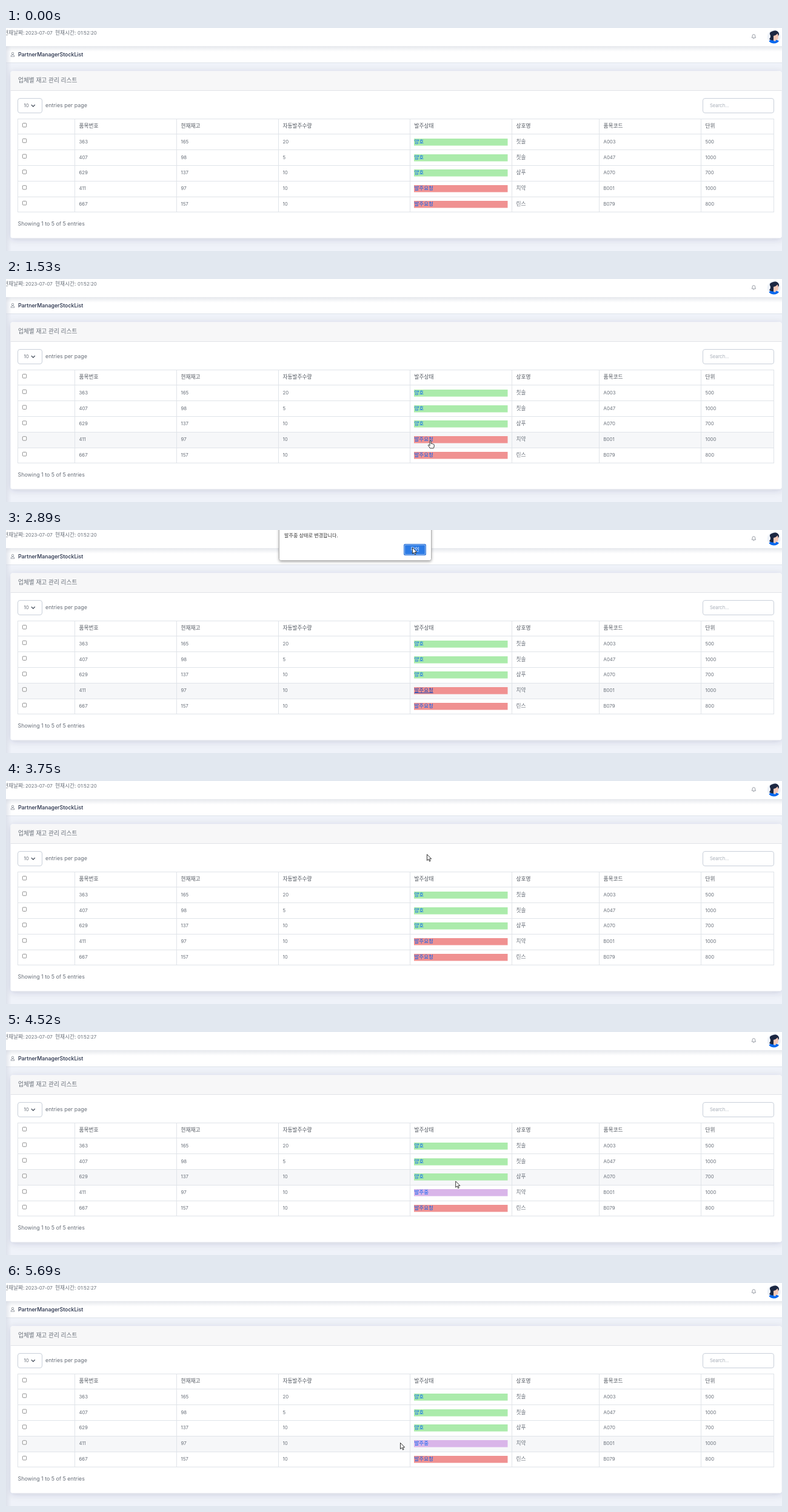
Animation, 1280 px wide and 369 px high, one loop 8 s. Source, as an HTML page:

```html
<!DOCTYPE html>
<html lang="ko">
<head>
<meta charset="utf-8">
<style>
  html, body { margin: 0; width: 100%; height: 100%; overflow: hidden; background: #eff2f9; }
  svg { display: block; width: 100%; height: 100%; }
  text { font-family: Inter, "Noto Sans CJK KR", "Noto Sans CJK", sans-serif; white-space: pre; }
</style>
</head>
<body>
<svg viewBox="0 0 1280 369">
  <defs>
    <linearGradient id="edge"><stop stop-color="#d5dae5" stop-opacity=".65"/><stop offset="1" stop-color="#d5dae5" stop-opacity="0"/></linearGradient>
    <linearGradient id="under" x2="0" y2="1"><stop stop-color="#dde0e6" stop-opacity=".75"/><stop offset="1" stop-color="#dde0e6" stop-opacity="0"/></linearGradient>
    <filter id="soft" x="-10%" y="-20%" width="120%" height="150%"><feDropShadow dx="0" dy="2" stdDeviation="6" flood-color="#213050" flood-opacity=".17"/></filter>
    <filter id="lift" x="-10%" y="-30%" width="120%" height="180%"><feDropShadow dx="0" dy="1.5" stdDeviation="2" flood-opacity=".35"/></filter>
    <clipPath id="round"><circle cx="1266.7" cy="14.5" r="11"/></clipPath>
  </defs>
  <g id="page"></g>
  <g id="dialog" display="none">
    <rect x="450.5" y="-20" width="251" height="70.5" rx="3" fill="#fff" stroke="#b3b3b3" filter="url(#lift)"/>
    <text x="459" y="11.7" font-size="8.1" fill="#333">발주중 상태로 변경합니다.</text>
    <rect x="656" y="23" width="37" height="19" rx="2.5" fill="#2a72d8"/>
    <rect x="657.5" y="24.5" width="34" height="16" rx="1.5" fill="#2c7be5" stroke="#cfe1f8" stroke-width=".7"/>
    <text x="674.5" y="35.4" font-size="8" fill="#fff" text-anchor="middle">확인</text>
  </g>
  <path id="arrow" d="M0 0V10.2L2.4 8 4 11.6 5.6 10.9 4 7.4H7.2Z" fill="#fff" stroke="#222" stroke-width=".9" stroke-linejoin="round"/>
  <path id="hand" d="M-1 1.2Q0-.6 1 1.2V5.4Q2.2 4.6 2.9 5.8 4 5.2 4.6 6.4 6 6 6.2 7.6V10Q6.2 11 5.2 13H-.6Q-1.6 11-3.5 8.8-4 7.4-2.6 7.4L-1 8.8Z" fill="#fff" stroke="#222" stroke-width=".9" stroke-linejoin="round"/>
</svg>
<script>
const LOOP = 8000, STEP = 69.4;
const DIALOG_OPEN = 1855, DIALOG_CLOSE = 3330, RELOAD = 3950, READY = 4090;
const COLUMNS = [19.5, 113.5, 281.5, 449.5, 666.5, 834.5, 978.5, 1146.5, 1266.5];
const HEADINGS = ['', '품목번호', '현재재고', '자동발주수량', '발주상태', '상호명', '품목코드', '단위'];
const ROWS = [
  ['363', '165', '20', '양호', '칫솔', 'A003', '500'],
  ['407', '98', '5', '양호', '칫솔', 'A047', '1000'],
  ['629', '137', '10', '양호', '샴푸', 'A070', '700'],
  ['411', '97', '10', '발주요청', '치약', 'B001', '1000'],
  ['667', '157', '10', '발주요청', '린스', 'B079', '800']
];
const STATUS_COLORS = { 양호: '#abebab', 발주요청: '#f09191', 발주중: '#d9b5e9' };
const ROW_HEIGHT = 25.8, TABLE_TOP = 150;
// time, x, y of the pointer tip
const PATH = [
  [70, 1194, 362], [350, 1010, 341], [840, 783, 307], [1000, 758, 291], [1130, 737, 285],
  [1280, 725, 268], [1500, 700, 267], [1860, 700, 267], [2200, 672, 150], [2550, 652, 53],
  [2880, 672.5, 26.5], [3340, 672.5, 26.5], [3750, 694.5, 121.5], [4030, 720, 173],
  [4100, 724, 183], [4520, 742, 248], [4640, 741, 262], [4920, 699, 266], [5690, 650.5, 264.5]
];

const byId = id => document.getElementById(id);
const rect = (x, y, w, h, fill, extra = '') =>
  `<rect x="${x}" y="${y}" width="${w}" height="${h}" fill="${fill}" ${extra}/>`;
const line = (d, color, width = 1) =>
  `<path d="${d}" fill="none" stroke="${color}" stroke-width="${width}"/>`;
const label = (x, y, string, { size, fill = '#69707a', extra = '' } = {}) =>
  `<text x="${x}" y="${y}" font-size="${size || (/[가-힣]/.test(string) ? 8.7 : 7.8)}" fill="${fill}" ${extra}>${string}</text>`;

function statusOf(row, phase) {
  return row === 3 && phase !== 'before' ? '발주중' : ROWS[row][3];
}

function drawHeader(phase, barBottom) {
  const blank = phase === 'blank';
  const clock = phase === 'before' ? '01:52:20' : '01:52:27';
  const iconY = blank ? 1.5 : 0;
  return rect(0, 0, 1280, barBottom, '#fff') + rect(0, 30, 1280, 9, 'url(#under)')
    + line(`M0 ${barBottom + .5}H1280`, '#dfe3ea')
    + (blank ? '' : label(-4, 11.3, '현재날짜:') + label(32, 11.3, '2023-07-07')
      + label(81, 11.3, '현재시간:') + label(118, 11.3, clock)
      + label(20, 46.7, 'PartnerManagerStockList', { size: 8.8, fill: '#212b45', extra: 'font-weight="500"' }))
    + line(`M8 ${47.2 + iconY}q0-3 3-3t3 3z`, '#868c96', .8)
    + `<circle cx="11" cy="${42 + iconY}" r="1.7" fill="none" stroke="#868c96" stroke-width=".8"/>`
    + line('M1230.2 16q1-1 1-3.3 0-2 2.2-2t2.2 2q0 2.3 1 3.3zM1232.6 17.6h1.6', '#7d838d', .8)
    + drawAvatar();
}

function drawAvatar() {
  return `<g clip-path="url(#round)">${rect(1255, 3, 24, 24, '#eef2f9')}
    <path d="M1257 27q0-6 6-8.500l8 1q6 2 7 8z" fill="#0868ee"/>
    <path d="M1259 18.500q3-3 1.500-7-2-4 2-5.500 8-4 11.500 1 2 3 0 6l-5 6q-5 3-10-.5z" fill="#1c2742"/>
    <path d="M1266 13q4-.5 6.500-4 2.500 5 .5 9.500-1 1.500-3 1l-.5 2q-2.500 1-3.500-1z" fill="#f6c9b8"/></g>`;
}

function drawTable(phase, top, hovered, underlined) {
  const blank = phase === 'blank';
  const bottom = top + 6 * ROW_HEIGHT;
  let out = '';
  if (hovered >= 0)
    out += rect(20, top + (hovered + 1) * ROW_HEIGHT, 1246.5, ROW_HEIGHT, '#f6f7f9');
  for (let i = 0; i < 7; i++) {
    const y = Math.floor(top + i * ROW_HEIGHT) + .5;
    out += line(`M19 ${y}H1267`, '#e0e4e9');
  }
  COLUMNS.forEach(x => out += line(`M${x} ${top}V${bottom}`, '#e0e4e9'));

  for (let i = 0; i < 6; i++) {
    const middle = top + (i + .5) * ROW_HEIGHT;
    const boxY = middle - (blank ? 3.4 : 5.4);
    out += rect(27.3, boxY, 6.4, 6.4, '#fff', 'rx="1.2" stroke="#777" stroke-width=".8"');
    if (i === 0) {
      HEADINGS.forEach((heading, c) => {
        if (!blank) out += label(COLUMNS[c] + 7, middle + 2.1, heading, { fill: '#50565f', extra: 'font-weight="500"' });
        else {
          const x = COLUMNS[c + 1] - 11.7;
          out += line(`M${x - 2} ${middle - 1}l2-2 2 2m-4 3l2 2 2-2`, '#a0a5ad', .8);
        }
      });
      continue;
    }
    const status = statusOf(i - 1, phase);
    out += rect(673, Math.round(middle - 5.9), 154.5, 11.6, STATUS_COLORS[status]);
    if (blank) continue;
    ROWS[i - 1].forEach((cell, c) => {
      const isStatus = c === 3, focus = underlined && i === 4;
      out += label(COLUMNS[c + 1] + 7, middle + 2, isStatus ? status : cell, isStatus
        ? { size: 8.5, fill: focus ? '#0a45bb' : '#0061f2', extra: `font-weight="500"${focus ? ' text-decoration="underline"' : ''}` }
        : {});
    });
  }
  return out;
}

function drawPage(phase, hovered, underlined) {
  const blank = phase === 'blank';
  const card = blank ? 74 : 71.5, cardBottom = blank ? 352.5 : 347.5;
  const control = blank ? 119.5 : 116.5;
  const selectWidth = blank ? 39 : 40, searchX = blank ? 1156.5 : 1149.5, searchHeight = blank ? 26 : 24;
  const outline = 'rx="3.5" stroke="#c9d0da"';
  return rect(0, 0, 1280, 369, '#eff2f9')
    + drawHeader(phase, blank ? 60 : 57)
    + rect(7.5, card, 1272, cardBottom - card, '#fff', 'rx="3.5" filter="url(#soft)"')
    + `<path d="M7.5 ${card + 32}v-28.5q0-3.5 3.5-3.5h1265q3.5 0 3.5 3.5v28.5z" fill="#f7f7f8"/>`
    + line(`M7.5 ${Math.floor(card + 32) + .5}H1279.5`, '#e1e3e7')
    + rect(0, 30, 9, 339, 'url(#edge)')
    + rect(19.5, control, selectWidth, 24, '#fff', outline)
    + rect(searchX, control, 1266.5 - searchX, searchHeight, '#fff', outline)
    + line(blank ? 'M40.5 130l3 3 3-3' : 'M41.8 127l3 3 3-3', '#505966', 1.3)
    + (blank ? '' : label(20, 90.4, '업체별 재고 관리 리스트', { size: 9.7 })
      + label(29.5, 131, '10') + label(65, 130.8, 'entries per page', { size: 8.9 })
      + label(1161, 131, 'Search...', { size: 7.6, fill: '#a7aeb8' })
      + label(19.5, 327.4, 'Showing 1 to 5 of 5 entries', { size: 8.85 }))
    + drawTable(phase, blank ? 155 : TABLE_TOP, hovered, underlined);
}

function pointerAt(t) {
  const next = PATH.findIndex(p => p[0] > t);
  if (next < 0) return PATH[PATH.length - 1].slice(1);
  if (next === 0) return [1300, 400];
  const [t0, x0, y0] = PATH[next - 1], [t1, x1, y1] = PATH[next];
  const k = (t - t0) / (t1 - t0);
  return [x0 + (x1 - x0) * k, y0 + (y1 - y0) * k];
}

let drawn = '';
function render(now) {
  const t = Math.floor((now % LOOP + 2) / STEP) * STEP + 2;
  const phase = t < RELOAD ? 'before' : t < READY ? 'blank' : 'after';
  const modal = t >= DIALOG_OPEN && t < DIALOG_CLOSE;
  const [x, y] = pointerAt(t);

  const under = Math.floor((y - TABLE_TOP) / ROW_HEIGHT) - 1;
  const inside = under >= 0 && under < 5 && phase !== 'blank';
  const hovered = modal ? 3 : inside ? under : -1;
  const underlined = t >= 1785 && t < DIALOG_CLOSE;

  const state = [phase, hovered, underlined].join();
  if (state !== drawn) {
    byId('page').innerHTML = drawPage(phase, hovered, underlined);
    drawn = state;
  }
  byId('dialog').setAttribute('display', modal ? 'inline' : 'none');

  const linkEnd = inside ? 674 + 7.9 * statusOf(under, phase).length : 0;
  const middle = TABLE_TOP + (under + 1.5) * ROW_HEIGHT;
  const overLink = !modal && x > 674 && x < linkEnd && Math.abs(y - middle) < 6;
  for (const id of ['arrow', 'hand']) {
    const shown = overLink === (id === 'hand');
    byId(id).setAttribute('display', shown ? 'inline' : 'none');
    byId(id).setAttribute('transform', `translate(${x} ${y})`);
  }
}

const start = performance.now();
function tick() {
  render(performance.now() - start);
  requestAnimationFrame(tick);
}
tick();
</script>
</body>
</html>
```
